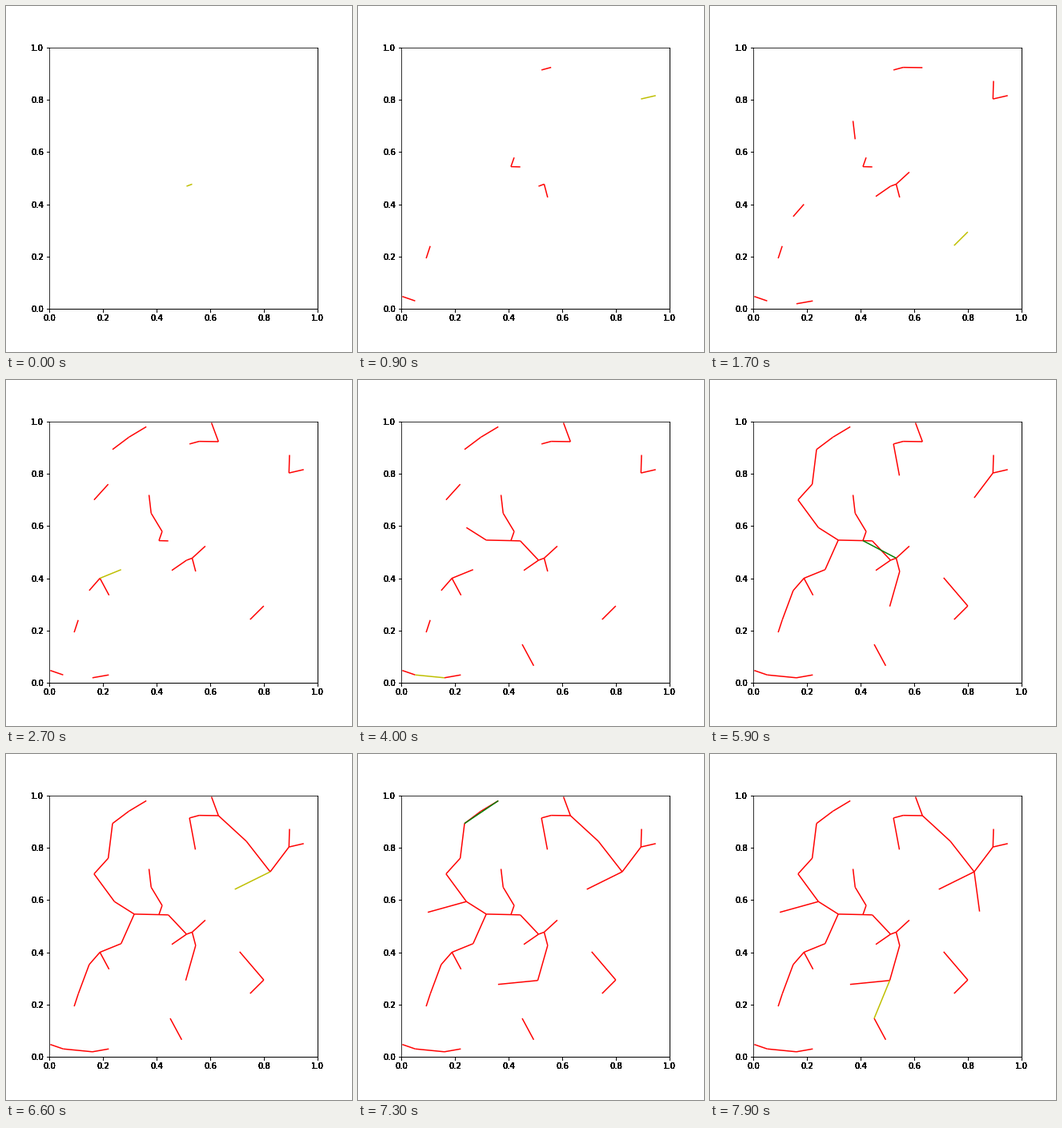
Recreate the animation shown at these times as a matplotlib script. Size 432 by 432 pixels, loop 8000 ms.

```python
from itertools import combinations
from math import dist

import matplotlib.pyplot as plt
from matplotlib.animation import FuncAnimation
from matplotlib.collections import LineCollection

STEPS = 80
LAYERS = 8
BOX = [0.125, 0.125, 0.775, 0.755]

# Key points of the graph, in thousandths; every edge follows from them
NODES = [
    (512, 469), (533, 477), (582, 523), (457, 430), (546, 426), (509, 292),
    (361, 277), (451, 147), (494, 65), (444, 543), (409, 544), (421, 579),
    (380, 649), (372, 719), (317, 546), (243, 594), (99, 553), (167, 700),
    (220, 760), (236, 893), (297, 940), (362, 980), (268, 433), (189, 400),
    (223, 335), (149, 353), (108, 240), (93, 193), (4, 47), (52, 30),
    (161, 19), (222, 30), (523, 914), (559, 924), (631, 923), (605, 995),
    (545, 793), (735, 825), (824, 708), (894, 803), (896, 872), (949, 816),
    (692, 641), (844, 556), (710, 402), (800, 294), (749, 242),
]


def kruskal(nodes, steps):
    """Yield (edge, accepted) for the shortest edges in order of length."""
    tree = {p: p for p in nodes}

    def root(p):
        while tree[p] != p:
            p = tree[p]
        return p

    edges = sorted(combinations(nodes, 2), key=lambda e: dist(*e))
    for edge in edges[:steps]:
        a, b = map(root, edge)
        tree[a] = b
        yield edge, a != b


def unit_axes(label):
    ax = fig.add_axes(BOX, label=label, facecolor="none")
    ax.set(xlim=(0, 1), ylim=(0, 1))
    return ax


fig = plt.figure(figsize=(6, 6), dpi=72, facecolor="white")
ax = unit_axes("graph")

# Overprinting darkens everything but the left and top spines
for layer in range(1, LAYERS):
    unit_axes(f"overprint {layer}").spines[["left", "top"]].set_visible(False)

points = [(x / 1000, y / 1000) for x, y in NODES]
trace = list(kruskal(points, STEPS))
lines = ax.add_collection(LineCollection([], linewidths=1.5))


def draw(step):
    kept = [edge for edge, accepted in trace[:step] if accepted]
    edge, accepted = trace[step]
    lines.set_segments(kept + [edge])
    lines.set_color(["r"] * len(kept) + ["y" if accepted else "g"])
    return [lines]


anim = FuncAnimation(fig, draw, frames=STEPS, interval=100,
                     repeat=True, repeat_delay=0)
plt.show()
```
